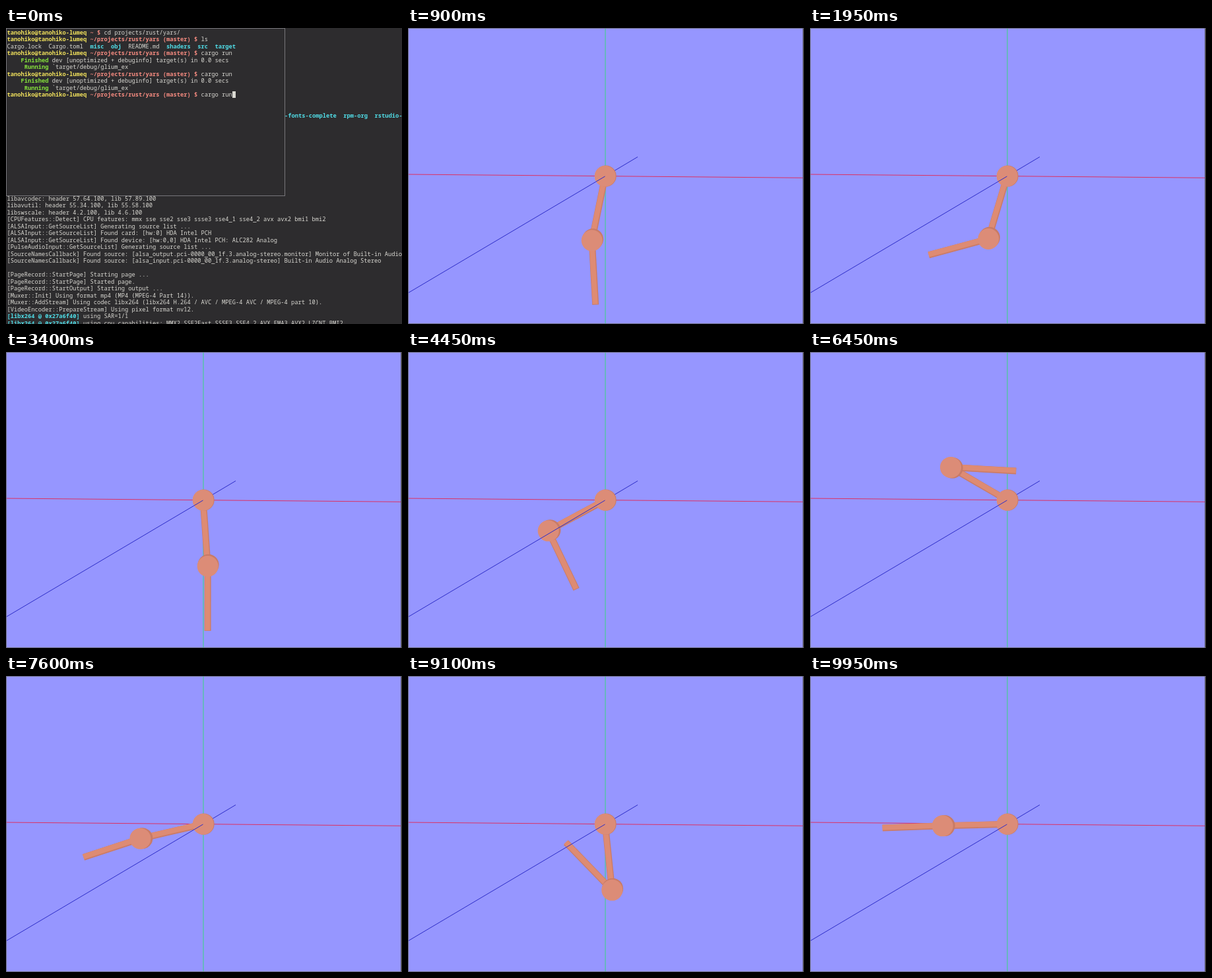
These frames come from a looping animation (600x449 px, 10 s). An HTML page:

```html
<!DOCTYPE html>
<html lang="en">
<head>
<meta charset="utf-8">
<title>Two-link arm</title>
<style>
html, body { margin: 0; width: 100%; height: 100%; overflow: hidden; background: #2d2c2e; }
#stage { position: relative; width: 600px; height: 449px; overflow: hidden; }
#term, #sim { position: absolute; left: 0; top: 0; width: 600px; height: 449px; overflow: hidden; }
pre {
  position: absolute; margin: 0; left: 1.5px; color: #d9d8d2; white-space: pre;
  font: 8.75px/10.5px "Noto Sans Mono", "DejaVu Sans Mono", monospace;
}
#front { position: absolute; box-sizing: border-box; left: 0; top: 0; width: 423px; height: 255px;
  background: #2d2c2e; border: 1px solid #77767a; }
#front pre { left: .5px; top: .75px; }
.y { color: #f0e05c; } .p { color: #f58b80; } .g { color: #86e23c; } .c { color: #50dce6; }
#cursor { display: inline-block; width: 5.5px; height: 10px; vertical-align: top; background: #d9d8d2; }
</style>
</head>
<body>
<div id="stage">
  <div id="term">
    <pre class="c" style="left:422px;top:127.5px"><b>-fonts-complete  rpm-org  rstudio-</b></pre>
    <pre style="top:253.75px">libavcodec: header 57.64.100, lib 57.89.100
libavutil: header 55.34.100, lib 55.58.100
libswscale: header 4.2.100, lib 4.6.100
[CPUFeatures::Detect] CPU features: mmx sse sse2 sse3 ssse3 sse4_1 sse4_2 avx avx2 bmi1 bmi2
[ALSAInput::GetSourceList] Generating source list ...
[ALSAInput::GetSourceList] Found card: [hw:0] HDA Intel PCH
[ALSAInput::GetSourceList] Found device: [hw:0,0] HDA Intel PCH: ALC282 Analog
[PulseAudioInput::GetSourceList] Generating source list ...
[SourceNamesCallback] Found source: [alsa_output.pci-0000_00_1f.3.analog-stereo.monitor] Monitor of Built-in Audio
[SourceNamesCallback] Found source: [alsa_input.pci-0000_00_1f.3.analog-stereo] Built-in Audio Analog Stereo

[PageRecord::StartPage] Starting page ...
[PageRecord::StartPage] Started page.
[PageRecord::StartOutput] Starting output ...
[Muxer::Init] Using format mp4 (MP4 (MPEG-4 Part 14)).
[Muxer::AddStream] Using codec libx264 (libx264 H.264 / AVC / MPEG-4 AVC / MPEG-4 part 10).
[VideoEncoder::PrepareStream] Using pixel format nv12.
<b class="c">[libx264 @ 0x27a6f40]</b> using SAR=1/1
<b class="c">[libx264 @ 0x27a6f40]</b> using cpu capabilities: MMX2 SSE2Fast SSSE3 SSE4.2 AVX FMA3 AVX2 LZCNT BMI2</pre>
    <div id="front"><pre id="shell"></pre></div>
  </div>
  <svg id="sim" viewBox="0 0 600 449">
    <rect width="600" height="449" fill="#9696ff"/>
    <path d="M299 0V449" stroke="#4fc79c" stroke-width="1.3"/>
    <path d="M0 222L598 227.3" stroke="#dc3060"/>
    <path d="M298.5 225L348 195.5" stroke="#2d2dc8"/>
    <g id="arm"></g>
    <path d="M0 402L298.5 225" stroke="#2d2dc8"/>
    <rect x=".5" y=".5" width="598" height="448" fill="none" stroke="#6a6a7c"/>
    <rect x="598.5" width="1.5" height="449" fill="#45444c"/>
  </svg>
</div>
<script>
const LOOP = 10000, STEP = 50, OPEN = 50;
const $ = id => document.getElementById(id);

// shell text
const tag = (cls, s) => `<b class="${cls}">${s}</b>`;
const prompt = (dir, cmd) => tag('y', 'tanohiko@tanohiko-lumeq') + ' ' + tag('p', dir + ' $') + ' ' + cmd;
const repo = '~/projects/rust/yars (master)';
const run = [
  prompt(repo, 'cargo run'),
  '    ' + tag('g', 'Finished') + ' dev [unoptimized + debuginfo] target(s) in 0.0 secs',
  '     ' + tag('g', 'Running') + ' `target/debug/glium_ex`'
];
const [misc, obj, shaders, src, target] =
  ['misc', 'obj', 'shaders', 'src', 'target'].map(s => tag('c', s));
$('shell').innerHTML = [
  prompt('~', 'cd projects/rust/yars/'),
  prompt(repo, 'ls'),
  ['Cargo.lock', 'Cargo.toml', misc, obj, 'README.md', shaders, src, target].join('  '),
  ...run, ...run,
  prompt(repo, 'cargo run') + '<i id="cursor"></i>'
].join('\n');

// key poses: time, upper angle, lower angle (degrees from straight down, right is positive)
const poses = [
  [50, 0, 0], [500, 12, 16], [1650, -50, -55], [1950, -16.6, -73], [2150, -30, -50],
  [2800, 38, 45], [3400, 4, 0], [3700, -30, -28], [4200, -33, 27], [5250, -196, -60],
  [5400, -202.4, -74.6], [6050, -360, -4], [6300, -446, 60], [6800, -512, 125],
  [7350, -436, 189], [7600, -437, 288], [8100, -350, 328], [8500, -292, 420],
  [9100, -354, 584.6], [9470, -266, 845], [9950, -448.5, 992]
];

// slope of the parabola through a pose and its neighbours
function slope(i, c) {
  const rate = j => (poses[j + 1][c] - poses[j][c]) / (poses[j + 1][0] - poses[j][0]);
  if (i === 0) return 0;
  if (i === poses.length - 1) return rate(i - 1);
  const before = poses[i][0] - poses[i - 1][0], after = poses[i + 1][0] - poses[i][0];
  return (rate(i - 1) * after + rate(i) * before) / (before + after);
}

function angle(t, c) {
  let i = 0;
  while (i < poses.length - 2 && t >= poses[i + 1][0]) i++;
  const a = poses[i], b = poses[i + 1], d = b[0] - a[0];
  const x = (t - a[0]) / d, y = 1 - x;
  const deg = a[c] * y * y * (1 + 2 * x) + b[c] * x * x * (1 + 2 * y)
    + d * x * y * (slope(i, c) * y - slope(i + 1, c) * x);
  return deg * Math.PI / 180;
}

// slightly turned camera: right and top are a little nearer
function project(u, v) {
  const s = 101.5 + 3.5 * u + 1.25 * v;
  return { x: 298.7 + s * u, y: 224.8 - s * v };
}

const n = v => v.toFixed(2);
const stroke = (a, b, color, w, dx = 0, dy = 0) =>
  `<path d="M${n(a.x + dx)} ${n(a.y + dy)}L${n(b.x + dx)} ${n(b.y + dy)}" stroke="${color}" stroke-width="${w}"/>`;

const rod = (a, b) => stroke(a, b, '#cb7c67', 10) + stroke(a, b, '#de8b73', 8, -0.4, -0.8);

// the back face of a disc leans towards the vanishing point
function disc(p) {
  const back = { x: p.x + (350 - p.x) * 0.02, y: p.y + (215 - p.y) * 0.02 };
  const dot = (q, color) => `<circle cx="${n(q.x)}" cy="${n(q.y)}" r="16" fill="${color}"/>`;
  return dot(back, '#c87b66') + dot(p, '#dc8c77');
}

function draw(t) {
  const open = t >= OPEN;
  $('term').style.display = open ? 'none' : 'block';
  $('sim').style.display = open ? 'block' : 'none';
  if (!open) return;
  const a = angle(t, 1), b = angle(t, 2);
  const u = Math.sin(a), v = -Math.cos(a);
  const base = project(0, 0), joint = project(u, v);
  const tip = project(u + Math.sin(b), v - Math.cos(b));
  $('arm').innerHTML = rod(base, joint) + rod(joint, tip) + disc(base) + disc(joint);
}

const start = performance.now();
function tick() {
  const t = (performance.now() - start) % LOOP;
  draw(Math.floor(t / STEP) * STEP);
  requestAnimationFrame(tick);
}
tick();
</script>
</body>
</html>
```
